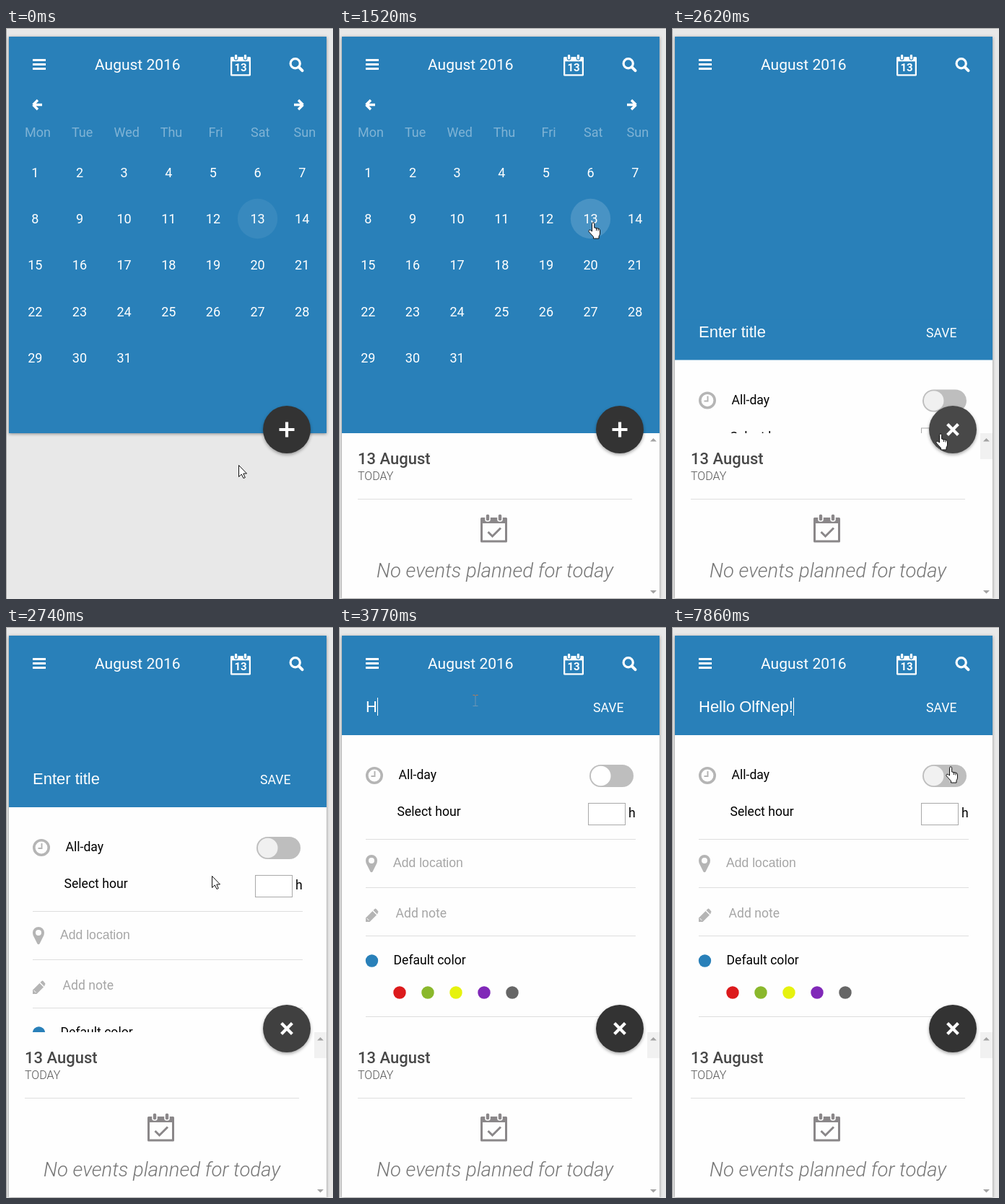
An HTML page for the animation above (8000 ms loop, 453 px wide and 792 px high).

```html
<!DOCTYPE html>
<html lang="en">
<head>
<meta charset="utf-8">
<title>Calendar</title>
<style>
  html, body { margin: 0; width: 100%; height: 100%; overflow: hidden; background: #e8e8e8; }
  svg { display: block; width: 453px; height: 792px; }
  text { font: 17.6px Roboto, sans-serif; white-space: pre; }
  .mid { text-anchor: middle; }
  .sheet { filter: drop-shadow(0 1px 2px rgba(0,0,0,.4)); }
  #fab { filter: drop-shadow(0 2px 2px rgba(0,0,0,.35)); }
  .head { font-size: 21px; }
  .cell { font-size: 18px; fill: #fff; }
  .weekday { font-size: 18px; fill: #fff; opacity: .4; }
  .input { font-family: "Liberation Sans", Arial, sans-serif; }
  #title { font-size: 22px; fill: #fff; }
  .hint { fill: #a6a6a6; }
  .rule { stroke: #dedede; }
</style>
</head>
<body>
<svg viewBox="0 0 453 792">
  <defs>
    <clipPath id="body"><rect x="4" y="94" width="440" height="468"/></clipPath>
    <g id="cal">
      <path d="M1.5 6.5H35.5V38H1.5Z" fill="none" stroke="currentColor" stroke-width="3" stroke-linejoin="round"/>
      <path d="M1 5H36V13H1Z" fill="currentColor"/>
      <g fill="currentColor" stroke="var(--bg)" stroke-width="1.6">
        <rect x="7" y="0" width="6" height="10" rx="2.5"/>
        <rect x="24" y="0" width="6" height="10" rx="2.5"/>
      </g>
    </g>
    <path id="arrowIcon" d="M1.5 0 8-6.5M1.5 0 8 6.5M1.5 0H14" fill="none" stroke="#fff" stroke-width="3.4"/>
  </defs>

  <rect width="453" height="792" fill="#e8e8e8"/>
  <path d="M.5 792V.5H453" fill="none" stroke="#a8a8a8"/>

  <g class="sheet">
    <rect id="paper" x="4" y="540" width="440" height="251" fill="#fefefe"/>
    <rect x="4" y="12" width="440" height="550" fill="#2980b9"/>
  </g>

  <g fill="#fff">
    <path d="M37 44.5H55M37 50.5H55M37 56.5H55" stroke="#fff" stroke-width="3"/>
    <text class="head" x="123" y="58">August 2016</text>
    <use href="#cal" transform="translate(311 36.5) scale(.757)" style="color:#fff;--bg:#2980b9"/>
    <text class="mid" x="325" y="59.5" style="font-size:15px;font-weight:700">13</text>
    <g fill="none" stroke="#fff">
      <circle cx="400.7" cy="49.3" r="6.6" stroke-width="3.2"/>
      <path d="M405.5 54.2 410.5 59.2" stroke-width="4" stroke-linecap="round"/>
    </g>
  </g>

  <g id="month">
    <use href="#arrowIcon" x="36" y="106.5"/>
    <use href="#arrowIcon" transform="translate(413 106.5) scale(-1 1)"/>
    <circle id="today" cx="348.5" cy="264.5" r="27.7" fill="#fff"/>
  </g>

  <g clip-path="url(#body)">
    <g id="form">
      <rect x="4" y="94" width="440" height="56" fill="#2980b9"/>
      <rect x="4" y="150" width="440" height="412" fill="#fefefe"/>
      <text id="title" class="input" x="37" y="118"></text>
      <rect id="caret" y="98" width="1" height="25" fill="#fff"/>
      <text x="352" y="118" fill="#fff">SAVE</text>

      <circle cx="49" cy="206" r="10.2" fill="none" stroke="#b5b5b5" stroke-width="3.6"/>
      <path d="M49.5 200V207H44.5" fill="none" stroke="#b5b5b5" stroke-width="2"/>
      <text x="82.5" y="211">All-day</text>
      <rect x="347" y="191" width="61" height="31" rx="15.5" fill="#bebebe"/>
      <circle id="knob" cx="362.7" cy="206.5" r="13.8"/>
      <text x="80.5" y="262">Select hour</text>
      <rect x="345.5" y="244.5" width="51" height="30" fill="#fff" stroke="#a9a9a9"/>
      <text x="401" y="264">h</text>

      <path d="M45 316a8 8 0 0 1 8 8q0 3-1.5 5.5L46.5 339.500q-1.500 1.500-3 0L38.500 329.500Q37 327 37 324a8 8 0 0 1 8-8Zm0 4a4 4 0 1 0 0 8a4 4 0 0 0 0-8Z" fill="#b5b5b5"/>
      <text class="input hint" x="75" y="333">Add location</text>
      <path d="M37 409V403.500L46.500 394 52 399.500 42.500 409ZM47.500 393 49.500 391q1-1 2 0L54 394q1 1 0 2L53 398.500Z" fill="#b5b5b5"/>
      <path d="M38.500 404 41.500 407" stroke="#fefefe"/>
      <text class="hint" x="78.500" y="403">Add note</text>
      <text x="75.500" y="468">Default color</text>
      <circle cx="45.500" cy="463" r="8.700" fill="#2980b9"/>
      <path class="rule" d="M37 294.500H411M37 361.500H411M37 428.500H411M37 540.500H411"/>
    </g>
  </g>

  <g id="agenda">
    <rect id="thumb" x="427" y="562" width="17" height="36" fill="#f1f1f1"/>
    <path d="M431 573.500 435.500 569 440 573.500ZM431 780 435.500 784.500 440 780Z" fill="#a3a3a3"/>
    <text x="26" y="605" fill="#484848" style="font-size:22px;font-weight:500">13 August</text>
    <text x="26" y="627" fill="#555" style="font-size:16px;font-weight:300">TODAY</text>
    <path class="rule" d="M26 653.500H406"/>
    <use href="#cal" x="196" y="674" style="color:#8a8789;--bg:#fefefe"/>
    <path d="M206.500 699 212.500 705 224 693.500" fill="none" stroke="#8a8789" stroke-width="3"/>
    <text class="mid" x="216" y="762" fill="#777" style="font-size:27.500px;font-weight:300;font-style:italic">No events planned for today</text>
  </g>

  <g id="fab">
    <circle id="disc" cx="389" cy="557" r="33"/>
    <path id="plus" d="M378.500 557H399.500M389 546.500V567.500" stroke="#fff" stroke-width="4.200"/>
  </g>

  <g id="pointer">
    <path id="arrow" d="M.5.5V16.500L4.300 13 7 18.500 9.300 17.500 6.800 12H11.500Z" fill="#fff" stroke="#111"/>
    <path id="hand" d="M5.500 13V2.500a1.600 1.600 0 0 1 3.200 0V8L14.500 9.200q2 .500 2 2.800V16q0 2-1.500 4V23H7.500V20.500L1.500 14q-1.500-2 .300-2.800 1.500-.500 3.700 1.800ZM11.500 8.500V12M14 9V12.500" fill="#fff" stroke="#111"/>
    <g id="beam" fill="none">
      <path d="M.500.500H3L4 1.500 5 .500H7.500" stroke="#c97b48"/>
      <path d="M4 1.500V15M.500 15.500H7.500" stroke="#6d96b5"/>
    </g>
  </g>
</svg>
<script>
const LOOP = 8000;
const $ = id => document.getElementById(id);

function add(parent, before, tag, attrs, text = "") {
  const el = document.createElementNS("http://www.w3.org/2000/svg", tag);
  for (const key in attrs) el.setAttribute(key, attrs[key]);
  el.textContent = text;
  parent.insertBefore(el, before);
}

const COLUMN = 61.65;
["Mon", "Tue", "Wed", "Thu", "Fri", "Sat", "Sun"].forEach((name, i) =>
  add($("month"), null, "text", { class: "weekday mid", x: 44 + i * COLUMN, y: 151 }, name));
for (let d = 0; d < 31; d++) {
  const y = 207 + Math.floor(d / 7) * 64.2;
  add($("month"), null, "text", { class: "cell mid", x: 40.3 + d % 7 * COLUMN, y }, d + 1);
}
["#dc1a1c", "#8ab82c", "#e6f20e", "#8028b8", "#666"].forEach((fill, i) =>
  add($("form"), null, "circle", { cx: 84 + i * 39, cy: 507, r: 8.7, fill }));

// Each track is a list of [start ms, ...values]; values hold until the next row.
const POINTER = [
  [0, "arrow", 322, 606], [580, "arrow", 324, 585], [700, "arrow", 335, 500],
  [820, "arrow", 347, 410], [940, "arrow", 356, 331], [1090, "hand", 349, 280],
  [1220, "hand", 347, 272], [1370, "hand", 345, 269], [2050, "arrow", 350, 390],
  [2170, "arrow", 352, 511], [2320, "hand", 361, 570], [2470, "hand", 365, 562],
  [2740, "arrow", 285, 345], [2880, "beam", 200, 121], [3000, "beam", 185, 94],
  [7600, "arrow", 294, 172], [7740, "hand", 370, 197], [7860, "hand", 379, 193]
];
const HALO = [[0, .07], [1220, .09], [1370, .12], [1520, .15], [2050, .1], [2170, .07]];
const DISC = [[0, "#333"], [2320, "#484848"], [2740, "#404040"], [2880, "#333"]];
const TURN = [[0, 0], [2470, 25], [2620, 45]];
const SLIDE = [[0, 470], [2620, 310.5], [2740, 100], [2880, 20], [3000, 0]];
const KNOB = [[0, "#f0f0f0"], [3160, "#fff"], [7740, "#f1f1f1"]];
const HINT = "Enter title", PHRASE = "Hello OlfNep!";
// Number of typed letters and whether the caret shows.
const TYPING = [
  [0, 0, false], [3000, 0, true], [3470, 0, false], [3770, 1, true], [3900, 2, true],
  [4200, 4, true], [4350, 5, true], [4510, 6, true], [5090, 6, false], [5520, 7, true],
  [5640, 8, true], [5790, 9, true], [6220, 10, true], [6350, 11, true], [6500, 12, true],
  [6750, 13, true], [7310, 13, false], [7740, 13, true]
];

const at = (track, t) => track.findLast(row => row[0] <= t).slice(1);
const show = (id, visible) => { $(id).style.display = visible ? "" : "none"; };

function draw(t) {
  const [shape, x, y] = at(POINTER, t);
  for (const id of ["arrow", "hand", "beam"]) show(id, id === shape);
  $("pointer").setAttribute("transform", `translate(${x} ${y})`);

  $("today").setAttribute("opacity", at(HALO, t)[0]);
  $("disc").setAttribute("fill", at(DISC, t)[0]);
  $("plus").setAttribute("transform", `rotate(${at(TURN, t)[0]} 389 557)`);
  $("knob").setAttribute("fill", at(KNOB, t)[0]);

  const editing = t >= 2620;
  show("paper", t >= 1520);
  show("agenda", t >= 1520);
  show("month", !editing);
  show("form", editing);
  show("thumb", editing);
  $("form").setAttribute("transform", `translate(0 ${at(SLIDE, t)[0]})`);

  const [count, caret] = at(TYPING, t);
  const title = $("title");
  title.textContent = count ? PHRASE.slice(0, count) : HINT;
  show("caret", caret);
  if (caret) {
    const end = count ? 37 + title.getComputedTextLength() : 37;
    $("caret").setAttribute("x", Math.round(end));
  }
}

function tick() {
  draw(performance.now() % LOOP);
  requestAnimationFrame(tick);
}
tick();
</script>
</body>
</html>
```
